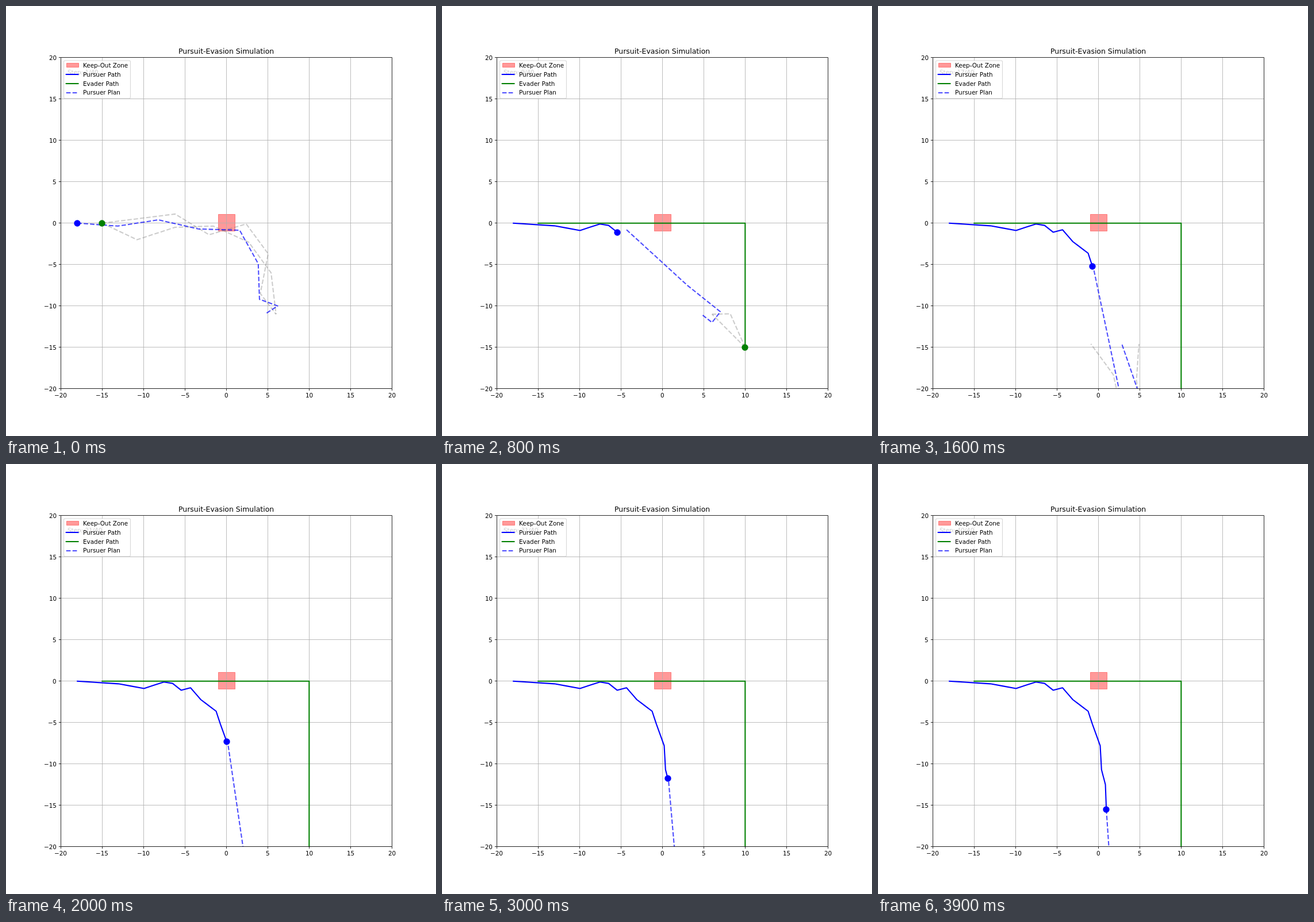
These frames come from a looping animation (748 by 748 pixels, 4 s). An HTML page with a canvas:

```html
<!DOCTYPE html>
<html lang="en">
<head>
<meta charset="utf-8">
<title>Pursuit-Evasion Simulation</title>
<style>
html, body { margin: 0; overflow: hidden; background: #fff; }
canvas { display: block; }
</style>
</head>
<body>
<canvas id="stage" width="748" height="748"></canvas>
<script>
const ctx = document.getElementById('stage').getContext('2d');
const STAGE = 748, PT = STAGE / 720, STEPS = 40, STEP_MS = 100, SPEED = 5;
const SIZE = STAGE * .77, LEFT = (STAGE * 1.025 - SIZE) / 2, TOP = STAGE * .12, UNIT = SIZE / 40;
const RIGHT = LEFT + SIZE, BOTTOM = TOP + SIZE;
const BLUE = '#00f', GREEN = '#008000', PLAN = 'rgba(0,0,255,.7)';
const GHOST = 'rgba(128,128,128,.4)', ZONE = 'rgba(255,0,0,.4)';
const DASH = [7.4 * PT, 3.2 * PT];

const px = x => LEFT + (x + 20) * UNIT;
const py = y => TOP + (20 - y) * UNIT;
const snapX = v => Math.round(v) + .5;
const snapY = v => STAGE - snapX(STAGE - v);
const mix = (a, b, t) => a.map((v, i) => v + (b[i] - v) * t);

// Turns of the pursuer: step, x, y
const turns = [
  [1, -18, 0], [2, -13.05, -.32], [4, -9.95, -.88], [6, -7.55, -.1], [7, -6.5, -.27],
  [8, -5.45, -1.1], [9, -4.33, -.8], [11, -3.08, -2.24], [14, -1.24, -3.63], [16, -.72, -5.2],
  [21, .22, -7.8], [27, .38, -10.7], [32, .85, -12.5], [39, .96, -15.5]
];

function pursuer(k) {
  const i = turns.findIndex(turn => turn[0] >= k);
  if (i < 1) return turns.at(i).slice(1);
  const [a, b] = [turns[i - 1], turns[i]];
  return mix(a, b, (k - a[0]) / (b[0] - a[0])).slice(1);
}

function evader(k) {
  return k <= 5 ? [SPEED * k - 15, 0] : [10, -SPEED * (k - 5)];
}

// Waypoints after the moving start, by step
const goal = [6, -11];
const planKeys = {
  0: [[-13.1, -.35], [-8.2, .4], [-3.4, -.7], [1.6, -.85], [3.85, -4.9], [4, -9.2], [6.2, -10], [4.8, -10.9]],
  4: [[-3.8, -2.3], [0, -5.1], [3.9, -8.5], [5, -11.8], [8.2, -14.6], [7.05, -10.9], [4.95, -10.75], [5, -11.05]],
  8: [[3, -7.5], [7, -10.7], [6, -12], [4.85, -11.1]],
  16: [[2.48, -20], [4.5, -28], [4.7, -20], [2.86, -14.67]]
};
const ghosts = [{
  0: [[-10.8, -2], [-6.2, -.5], [-1.6, -.35], [2.7, -2.3], [5.4, -6], goal],
  4: [[2.6, -2.8], [4.2, -7.5], goal],
  8: [[8.2, -10.95], goal],
  16: [[1.8, -18.3], [-.9, -14.6]]
}, {
  0: [[-6.2, 1.1], [-2.1, -1.4], [2.4, -.1], [5.05, -3.7], [4.1, -8.5], goal],
  4: [[5, -8.5], goal],
  8: [goal],
  16: [[4.6, -19], [4.9, -14.6]]
}];

// Point at fraction u of a polyline whose segments count equally
function along(points, u) {
  const s = u * (points.length - 1), i = Math.min(Math.floor(s), points.length - 2);
  return mix(points[i], points[i + 1], s - i);
}

// Blend neighbouring keys; past the last one the route sinks with the evader
function route(start, keys, k, lastPower = 1) {
  const times = Object.keys(keys).map(Number), last = times.at(-1);
  if (k >= last) return [start, ...keys[last].map(([x, y]) => [x, y - (k - last) * SPEED])];
  const next = times.findIndex(t => t > k), from = times[next - 1], to = times[next];
  const t = ((k - from) / (to - from)) ** (to === last ? lastPower : 1);
  const a = [start, ...keys[from]], b = [start, ...keys[to]], count = keys[0].length;
  return Array.from({ length: count + 1 }, (_, i) => mix(along(a, i / count), along(b, i / count), t));
}

function plan(k) {
  const points = route(pursuer(Math.min(k + 1, STEPS - 1)), planKeys, k);
  if (k > 16) points[1] = [1.16 + 1.32 * Math.exp((16 - k) / 9), -20];
  return points;
}

function line(points, color, width, dash = [], cap = 'butt') {
  ctx.strokeStyle = color;
  ctx.lineWidth = width * PT;
  ctx.lineCap = cap;
  ctx.lineJoin = 'round';
  ctx.setLineDash(dash);
  ctx.beginPath();
  points.forEach(p => ctx.lineTo(...p));
  ctx.stroke();
  ctx.setLineDash([]);
}

function track(points, color, dash, cap) {
  line(points.map(([x, y]) => [px(x), py(y)]), color, 2, dash, cap);
}

// Text sits on whole pixels; anchor is 0 for left, .5 for centre, 1 for right
function text(str, x, y, anchor = 0, size = 10) {
  ctx.font = `${size * PT}px "DejaVu Sans", sans-serif`;
  ctx.fillStyle = '#000';
  ctx.fillText(str, Math.round(x - ctx.measureText(str).width * anchor), Math.round(y));
}

function box(x, y, w, h) {
  ctx.fillStyle = ctx.strokeStyle = ZONE;
  ctx.lineWidth = PT;
  ctx.fillRect(x, y, w, h);
  ctx.strokeRect(x, y, w, h);
}

function dot([x, y], color) {
  ctx.fillStyle = color;
  ctx.beginPath();
  ctx.arc(Math.round(px(x)), Math.round(py(y)), 5.5 * PT, 0, 7);
  ctx.fill();
}

function eachTick(fn) {
  for (let v = -20; v <= 20; v += 5) fn(snapX(px(v)), snapY(py(v)), v);
}

function axes() {
  eachTick((x, y, v) => {
    const label = String(v).replace('-', '\u2212');
    line([[x, snapY(BOTTOM)], [x, snapY(BOTTOM) + 3.5 * PT]], '#000', .8);
    line([[snapX(LEFT), y], [snapX(LEFT) - 3.5 * PT, y]], '#000', .8);
    text(label, px(v), 681, .5);
    text(label, LEFT - 7 * PT, py(v) + 3.9, 1);
  });
  ctx.strokeStyle = '#000';
  ctx.lineWidth = .8 * PT;
  ctx.strokeRect(snapX(LEFT), snapY(TOP), Math.round(SIZE), Math.round(SIZE));
  text('Pursuit-Evasion Simulation', px(0), 83.4, .5, 12);
}

function legend() {
  ctx.beginPath();
  ctx.roundRect(100.56, 94.95, 115.9, 65.7, 2 * PT);
  ctx.fillStyle = 'rgba(255,255,255,.8)';
  ctx.fill();
  ctx.strokeStyle = 'rgba(204,204,204,.8)';
  ctx.lineWidth = PT;
  ctx.stroke();
  const x = 104.7, w = 20 * PT;
  ['Keep-Out Zone', 'Pursuer Path', 'Evader Path', 'Pursuer Plan'].forEach((label, i) => {
    const y = 103.7 + 15.65 * i, ends = [[x, Math.round(y)], [x + w, Math.round(y)]];
    if (i === 0) box(snapX(x), snapY(y - 3.5 * PT), 21, 7);
    if (i === 1) line(ends, BLUE, 2, [], 'square');
    if (i === 2) line(ends, GREEN, 2, [], 'square');
    if (i === 3) line(ends, PLAN, 2, DASH);
    text(label, 133.8, y + 3.64);
  });
}

function draw(k) {
  ctx.fillStyle = '#fff';
  ctx.fillRect(0, 0, STAGE, STAGE);
  ctx.save();
  ctx.beginPath();
  ctx.rect(LEFT, TOP, SIZE, SIZE);
  ctx.clip();
  box(snapX(px(-1)), snapY(py(1)), 29, 29);
  eachTick((x, y) => {
    line([[x, TOP], [x, BOTTOM]], '#b0b0b0', .8);
    line([[LEFT, y], [RIGHT, y]], '#b0b0b0', .8);
  });
  const steps = Array.from({ length: k + 1 }, (_, i) => i);
  track(steps.map(pursuer), BLUE, [], 'square');
  track(steps.map(evader), GREEN, [], 'square');
  ghosts.forEach(keys => track(route(evader(k), keys, k, 4), GHOST, DASH));
  track(plan(k), PLAN, DASH);
  dot(pursuer(k), BLUE);
  dot(evader(k), GREEN);
  ctx.restore();
  axes();
  text(`Step: ${k + 1}/${STEPS}`, LEFT + .02 * SIZE, TOP + .05 * SIZE);
  legend();
}

function tick() {
  draw(Math.floor(performance.now() / STEP_MS) % STEPS);
  requestAnimationFrame(tick);
}
tick();
</script>
</body>
</html>
```
